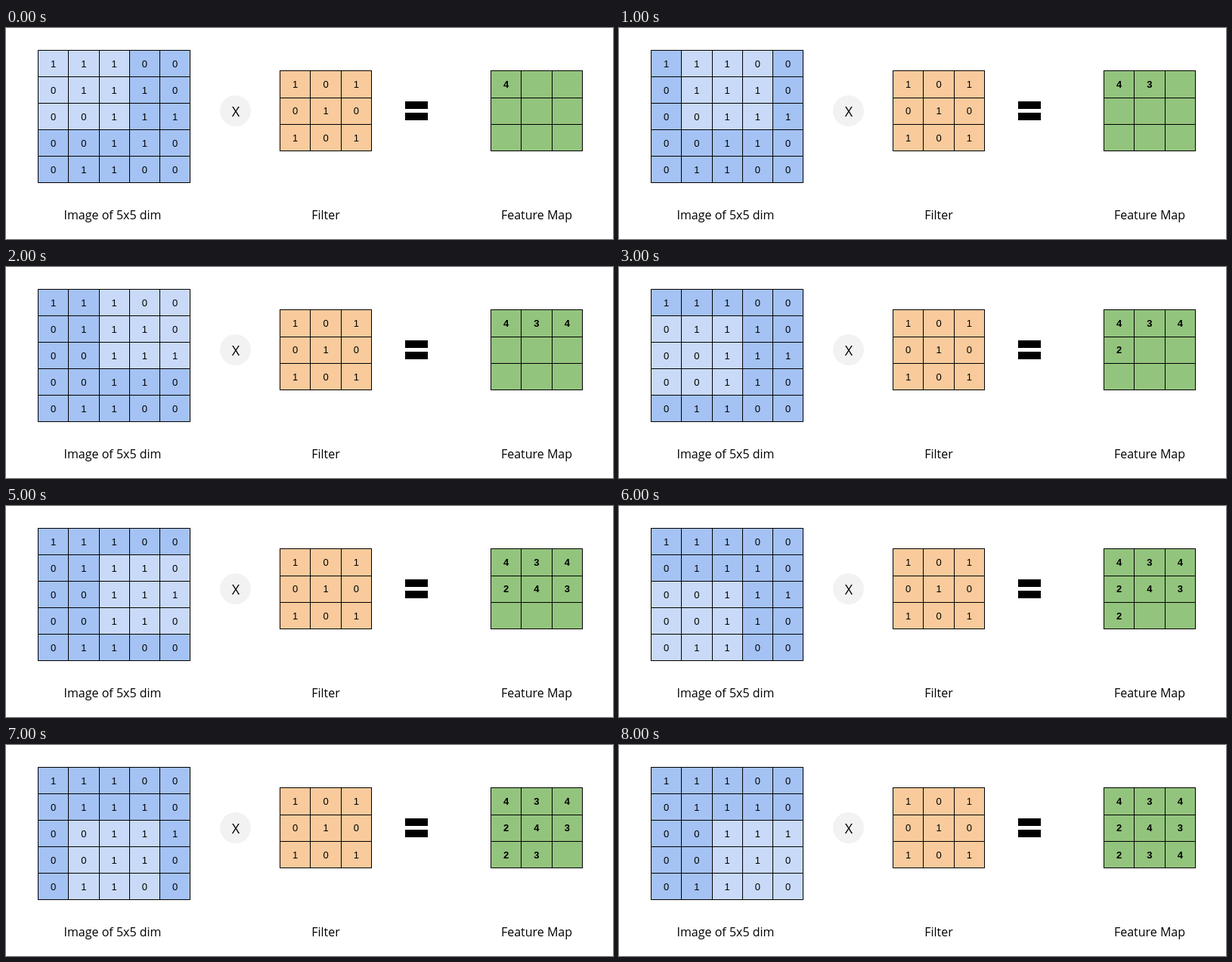
These frames come from a looping animation (803x279 px, 9 s). An HTML page with a canvas:

```html
<!DOCTYPE html>
<html lang="en">
<head>
<meta charset="utf-8">
<title>Convolution</title>
<style>
html, body { margin: 0; width: 100%; height: 100%; overflow: hidden; background: #fff; }
canvas { display: block; }
</style>
</head>
<body>
<canvas id="stage" width="803" height="279"></canvas>
<script>
const ctx = document.getElementById('stage').getContext('2d');
const STEP = 1000, STEPS = 9;
const DIGITS = '13px "Liberation Sans", Arial, sans-serif';
const LABEL = '16px "Open Sans", sans-serif';

const image = ['11100', '01110', '00111', '00110', '01100'];
const filter = ['101', '010', '101'];

// Sum of the image under the filter, with its corner at the given cell
function convolve(row, col) {
  let sum = 0;
  for (let r = 0; r < 3; r++)
    for (let c = 0; c < 3; c++) sum += image[row + r][col + c] * filter[r][c];
  return sum;
}

function text(str, x, y, font) {
  ctx.font = font;
  ctx.fillStyle = '#000';
  ctx.fillText(str, x, y);
}

function grid(n, left, top, w, h, font, color, value) {
  const x = i => Math.round(left + i * w);
  const y = i => Math.round(top + i * h);
  for (let r = 0; r < n; r++) {
    for (let c = 0; c < n; c++) {
      ctx.fillStyle = color(r, c);
      ctx.fillRect(x(c), y(r), x(c + 1) - x(c), y(r + 1) - y(r));
      text(value(r, c), left + (c + 0.5) * w + 0.5, Math.round(top + (r + 0.5) * h + 5), font);
    }
  }
  ctx.fillStyle = '#000';
  for (let i = 0; i <= n; i++) {
    ctx.fillRect(x(i), y(0), 1, y(n) - y(0) + 1);
    ctx.fillRect(x(0), y(i), x(n) - x(0) + 1, 1);
  }
}

function draw(step) {
  const row = Math.floor(step / 3), col = step % 3;
  const inWindow = (r, c) => r >= row && r < row + 3 && c >= col && c < col + 3;

  ctx.fillStyle = '#fff';
  ctx.fillRect(0, 0, 803, 279);
  ctx.textAlign = 'center';

  grid(5, 42, 29, 40.25, 35, DIGITS,
    (r, c) => inWindow(r, c) ? '#c9daf8' : '#a4c2f4', (r, c) => image[r][c]);
  grid(3, 362, 56.2, 40.35, 35.4, DIGITS,
    () => '#f9cb9c', (r, c) => filter[r][c]);
  grid(3, 641, 56.2, 40.3, 35.4, 'bold ' + DIGITS,
    () => '#93c47d', (r, c) => r * 3 + c <= step ? convolve(r, c) : '');

  ctx.fillStyle = '#f2f2f2';
  ctx.beginPath();
  ctx.arc(303.5, 109.5, 20.5, 0, Math.PI * 2);
  ctx.fill();
  text('X', 304, 117, '18px "Open Sans", sans-serif');

  ctx.fillRect(528, 97, 30, 10);
  ctx.fillRect(528, 112, 30, 10);

  text('Image of 5x5 dim', 141, 253, LABEL);
  text('Filter', 423, 253, LABEL);
  text('Feature Map', 702, 253, LABEL);
}

const start = performance.now();
function tick() {
  draw(Math.floor((performance.now() - start) / STEP) % STEPS);
  requestAnimationFrame(tick);
}
tick();
</script>
</body>
</html>
```
